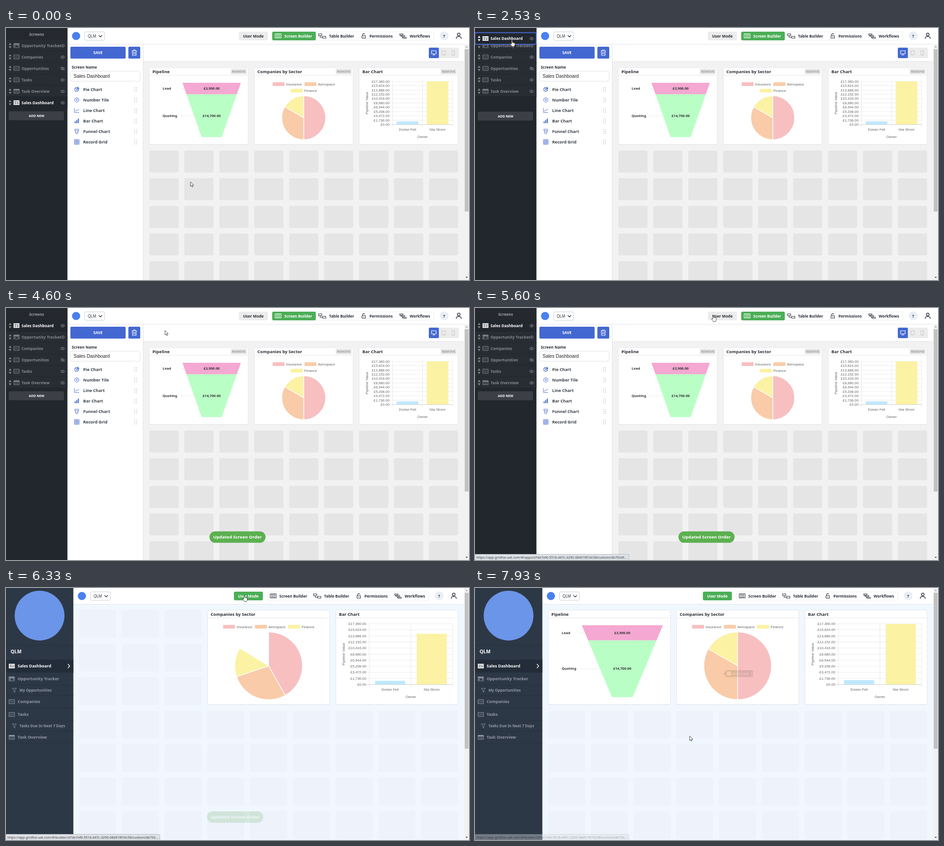
Write an HTML page that moves like this. It is 1014 px wide and 552 px high and loops after 8000 ms.

```html
<!DOCTYPE html>
<html lang="en">
<head>
<meta charset="utf-8">
<title>Screen order</title>
<style>
  html, body { margin: 0; width: 100%; height: 100%; overflow: hidden; background: #fff; }
  svg { display: block; width: 1014px; height: 552px; }
  text { font-family: "Noto Sans", "Open Sans", sans-serif; white-space: pre; }
  .arial { font-family: "Liberation Sans", Arial, sans-serif; }
</style>
</head>
<body>
<svg id="stage" viewBox="0 0 1014 552"></svg>
<script>
const LOOP = 8000;
const BLUE = '#4468d1', GREEN = '#4bae56', INK = '#2b3038';
const APP = 'QLM', OWNERS = ['Dorian Fell', 'Nia Strom'];
const SECTORS = [['Insurance', '#f7bfc0', 3], ['Aerospace', '#f9cba8', 2], ['Finance', '#fbf2a3', 1]];

// Drawing helpers
const rect = (x, y, w, h, fill, more = '') =>
  `<rect x="${x}" y="${y}" width="${w}" height="${h}" fill="${fill}" ${more}/>`;
const path = (d, stroke, width = 1, fill = 'none', more = '') =>
  `<path d="${d}" fill="${fill}" stroke="${stroke}" stroke-width="${width}" ${more}/>`;
const circle = (x, y, r, fill, more = '') => `<circle cx="${x}" cy="${y}" r="${r}" fill="${fill}" ${more}/>`;
// y is the vertical centre of the capitals
const text = (x, y, s, size, fill, weight = 600, anchor = 'start', more = '') =>
  `<text x="${x}" y="${(y + size * .36).toFixed(2)}" font-size="${size}" fill="${fill}" font-weight="${weight}" text-anchor="${anchor}" ${more}>${s}</text>`;
const label = (x, y, s, anchor = 'start', more = '') =>
  text(x, y, s, 7.8, '#666', 400, anchor, 'class="arial" ' + more);
const at = (x, y, body, more = '') => `<g transform="translate(${x} ${y})" ${more}>${body}</g>`;
const money = n => '£' + n.toLocaleString('en-US') + '.00';

// Small icons, centred on 0,0
const screenIcon = (kind, c) => {
  const frame = path('M-6-4.5H6V4.5H-6Z', c);
  if (kind === 'board') return frame + path('M-6-3.5H6', c, 2) + path('M-3.5-3V3M0-3V0M3.5-3V2', c, 1.8);
  if (kind === 'dash') return rect(-6.5, -5, 13, 10, c) + path('M-6-2H6M-6 1.5H6M-2-4V4M2.5-2V4', '#22262d', .7);
  if (kind === 'day') return frame + path('M-6-3H6', c, 2.5) + path('M-4 0H4M-4 2.5H4', c, 1, 'none', 'stroke-dasharray="2 1"');
  return frame + path('M-5-2H5M-5 0H5M-5 2H5', c, .8, 'none', 'opacity=".6"');
};
const eye = (c, off) => path('M-5 0Q0-6 5 0Q0 6-5 0Z', c, .9) + circle(0, 0, 1.6, 'none', `stroke="${c}" stroke-width=".9"`) +
  (off ? path('M-4-4L4.5 4', c, 1) : '');
const person = path('M-5.3 6.5V5Q-5.3 1.6-2 1.6H2Q5.3 1.6 5.3 5V6.5', INK, 1.4) +
  circle(0, -3, 3, 'none', `stroke="${INK}" stroke-width="1.4"`);
const filter = c => path('M-4.5-4.5H4.5L1 0V4.5L-1 3V0Z', c, .9);
const navIcons = [
  path('M-6.5-4.5H6.5V4.5H-6.5ZM-3.2-4.5V4.5M0-4.5V4.5M3.2-4.5V4.5', 'currentColor', 1.1),
  path('M-8-4.5H-1V-.5H-8ZM1 1H8V5H1ZM-4.5-.5V3H1', 'currentColor', 1.1),
  path('M-3.8-.5H3.8V5H-3.8ZM-2.3-.5V-3Q-2.3-5.2 0-5.2Q2.3-5.2 2.3-3.2M0 1.5V3', 'currentColor', 1.1),
  path('M-7.5-4.5H0V-2H-7.5ZM-3.5-1H4V1.5H-3.5ZM0 3H7.5V5.5H0ZM-6-2V.3H-3.5M-1 1.5V4.3H0', 'currentColor', 1)
];
const partIcons = [
  path('M-1-4A4.3 4.3 0 1 0 4 1H-1Z', BLUE, 1.1) + path('M1-5A4 4 0 0 1 5-1H1Z', BLUE, .5, BLUE),
  circle(0, 0, 4.8, 'none', `stroke="${BLUE}"`) + text(0, 0, '42', 4.5, BLUE, 700, 'middle'),
  path('M-5-5V4.5H5M-3 2L-.5-1L1 .5L5-3.5', BLUE, 1),
  path('M-3.5 1V5M0-2V5M3.5-5V5', BLUE, 2.2),
  path('M-4.5-5H4.5L1.8 5H-1.8ZM-3.8-2H3.8M-2.8 1.3H2.8', BLUE, .9),
  path('M-5-5H5V5H-5ZM-5-1.7H5M-5 1.7H5M-1.7-5V5M1.7-5V5', BLUE, 1)
];

// dx moves the left part, dr the right part; active is the chosen mode
function topBar(x0, dx, dr, active) {
  const names = ['Screen Builder', 'Table Builder', 'Permissions', 'Workflows'];
  const iconX = [596, 692.5, 783.5, 869.5], textX = [609.5, 707.5, 796, 884];
  const on = active === 'build';
  let s = rect(x0, 0, 1014 - x0, 35, '#fff') + path(`M${x0} 35.5H1003.5`, '#e2e4e8');
  s += circle(153.5 + dx, 17.5, 9, '#4a80ee');
  s += rect(172.5 + dx, 8.5, 43.5, 18.5, '#fff', 'rx="3" stroke="#c9ccd2"') + text(179 + dx, 17.8, APP, 8.4, INK, 400) +
    path(`M${203 + dx} 16l3.7 3.5l3.7-3.5`, INK, 1.4);
  s += rect(583.5 + dr, 8.5, 353, 18.5, '#fff', 'rx="3" stroke="#eceef0"');
  s += rect(510 + dr, 8, 63.5, 19, on ? '#ececec' : GREEN, 'rx="3"');
  if (on) s += rect(583, 8, 95.5, 19, GREEN, 'rx="3"');
  s += text(541.7 + dr, 17.5, 'User Mode', 8.45, on ? INK : '#fff', 600, 'middle');
  names.forEach((n, i) => {
    const c = on && !i ? '#fff' : INK;
    s += at(iconX[i] + dr, 17.3, navIcons[i], `color="${c}"`) + text(textX[i] + dr, 17.5, n, 8.45, c);
  });
  return s + circle(959.5 + dr, 17.2, 9.7, '#eaeef7') + text(959.5 + dr, 17.2, '?', 9.5, INK, 700, 'middle') +
    at(991.5 + dr, 17.3, person);
}

function scrollbar(top, end) {
  return rect(1003.5, top, 10.5, 552 - top, '#f1f1f1') + rect(1004.7, top + 10.5, 8.3, end - top - 10.5, '#c1c1c1') +
    path(`M1006.5 ${top + 6.5}l2.5-3l2.5 3Z`, 'none', 0, '#a3a3a3') + path('M1006.5 545l2.5 3l2.5-3Z', 'none', 0, '#505050');
}

function tiles(x, y, stepX, stepY, w, h, rows, fill) {
  let s = '';
  for (let r = 0; r < rows; r++) for (let c = 0; c < 9; c++)
    s += rect((x + c * stepX).toFixed(1), (y + r * stepY).toFixed(1), w, h, fill, 'rx="4"');
  return s;
}

function card(x, y, w, title, head, remove) {
  return rect(x, y + 1, w, 255 - y, '#000', 'rx="4" opacity=".06"') +
    rect(x, y, w, 255 - y, '#fff', 'rx="3.5" stroke="#e0e2e6" stroke-width=".8"') +
    path(`M${x} ${y + head}H${x + w}`, '#e6e6e8') + text(x + 6.8, y + head / 2 + .2, title, 9.45, INK) +
    (remove ? rect(x + w - 38, y + 2.3, 35, 12, '#e7e7e7', 'rx="2"') + text(x + w - 20.5, y + 8.2, 'REMOVE', 7.1, '#9b9b9b', 700, 'middle') : '');
}

function funnel(lx, mid, top, cut, halfTop, halfEnd) {
  const half = halfTop + (halfEnd - halfTop) * (cut - top) / (239 - top);
  const band = (y1, h1, y2, h2, fill) => path(`M${mid - h1} ${y1}H${mid + h1}L${mid + h2} ${y2}H${mid - h2}Z`, 'none', 0, fill);
  const line = (name, sum, y, h) => path(`M${lx + 38} ${y + .5}H${mid - h}`, '#e9e9e9', .8) +
    text(lx, y, name, 7.75, '#333', 700) + text(mid, y, sum, 7.7, '#333', 700, 'middle');
  const y1 = (top + cut) / 2 - .3, y2 = (cut + 239) / 2 - .3;
  return band(top, halfTop, cut, half, '#f5a8d1') + band(cut, half, 239, halfEnd, '#b9ffc5') +
    line('Lead', money(3900), y1, (halfTop + half) / 2) + line('Quoting', money(14700), y2, (half + halfEnd) / 2);
}

function pie(cx, cy, r, p) {
  let a = 0, s = '';
  const pt = v => `${(cx + r * Math.sin(v)).toFixed(2)} ${(cy - r * Math.cos(v)).toFixed(2)}`;
  for (const [, fill, n] of SECTORS) {
    const b = a + n / 6 * 2 * Math.PI * p;
    s += path(`M${cx} ${cy}L${pt(a)}A${r} ${r} 0 ${b - a > Math.PI ? 1 : 0} 1 ${pt(b)}Z`, '#fff', 1.4, fill);
    a = b;
  }
  return s;
}
const legend = spots => spots.map(([x, y], i) =>
  rect(x, y - 4, 26, 8, SECTORS[i][1]) + label(x + 29.5, y, SECTORS[i][0])).join('');

function axes(left, top, titleX) {
  const mid = (left + 978) / 2, step = (211.5 - top) / 10;
  let s = '';
  for (let i = 0; i <= 10; i++) {
    const y = 211.5 - i * step;
    s += path(`M${left - 4} ${y}H978`, i ? '#e6e6e6' : '#bdbdbd', .8) + label(left - 6.5, y - .2, money(1736 * i), 'end');
  }
  s += path(`M${left} ${top}V217M${mid} ${top}V217M978 ${top}V217`, '#e3e3e3', .8);
  OWNERS.forEach((n, i) => s += label(left + (978 - left) * (i / 2 + .25), 222.3, n, 'middle'));
  return s + label(mid, 237.7, 'Owner', 'middle') +
    label(0, 0, 'Pipeline Value', 'middle', `transform="translate(${titleX} ${(top + 211.5) / 2}) rotate(-90)"`);
}
function bars(left, top, p) {
  const half = (978 - left) / 2, w = half * .72, full = (211.2 - top) * p;
  return [[.071, '#bfe8fc'], [1, '#fbf2a3']].map(([v, fill], i) =>
    rect(left + half * (i + .14), 211.2 - full * v, w, full * v, fill)).join('');
}

// Builder page
const ROWS = [['Opportunity Tracker', 'board'], ['Companies', 'list'], ['Opportunities', 'list'],
  ['Tasks', 'list'], ['Task Overview', 'day'], ['Sales Dashboard', 'dash']];
function sideRow([name, kind], i) {
  const on = i === 5, c = on ? '#fff' : '#85898f';
  return `<g id="row${i}">` + rect(0, -12.5, 134.5, 25, on ? '#22262d' : '#282c33') + path('M0 12.2H134.5', '#1f2329', .8) +
    (on ? rect(0, -12.7, 134, 25.4, '#22262d', `id="lift" rx="3" stroke="${BLUE}" stroke-width="2"`) : '') +
    path('M6-1.5L9-6L12-1.5ZM6 1.5L9 6L12 1.5Z', 'none', 0, '#85898f', on ? 'id="grip"' : '') +
    at(23, 0, screenIcon(kind, c)) + text(34, 0, name, 8.56, c) + at(124, .3, eye('#85898f', i === 2)) + '</g>';
}

function builderPage() {
  const parts = ['Pie Chart', 'Number Tile', 'Line Chart', 'Bar Chart', 'Funnel Chart', 'Record Grid'];
  let s = rect(0, 0, 1014, 552, '#f2f2f2') + rect(135, 0, 166, 552, '#fff') + rect(301, 36, 703, 37, '#fff') +
    path('M301 73.5H1003.5', '#e3e3e3') + path('M300.5 36V552', '#e0e0e0') + topBar(134, 0, 0, 'build');
  s += rect(141, 41, 121, 26, BLUE, 'rx="2.5"') + text(201.3, 54.2, 'SAVE', 8.36, '#fff', 700, 'middle');
  s += rect(268, 41, 26, 26, BLUE, 'rx="2.5"') +
    at(281, 54, path('M-5.5-4H5.5M-2-4V-6H2V-4M-4.3-4L-3.8 6H3.8L4.3-4M-1.5-1.5V3.5M1.5-1.5V3.5', '#fff', 1.2));
  s += text(144, 86, 'Screen Name', 8.4, INK) + rect(141.5, 94.5, 152, 22, '#fff', 'rx="2.5" stroke="#dfe1e5"') +
    text(148, 105.2, 'Sales Dashboard', 10.35, '#222', 400, 'start', 'class="arial"');
  parts.forEach((n, i) => {
    const y = 134.4 + 23.05 * i;
    s += at(155, y, partIcons[i]) + text(169, y, n, 9.15, '#3a4048');
    for (let k = 0; k < 6; k++) s += circle(282 + k % 2 * 4, y - 4 + (k >> 1) * 4, 1, '#c4c4c4');
  });
  s += rect(926, 43, 66, 23, '#ececec', 'rx="2.5"') + rect(926, 43, 22, 23, BLUE, 'rx="2.5"') +
    at(937, 54.5, path('M-5-4.5H5V2H-5ZM0 2V4.5M-3 4.5H3', '#fff', 1.2)) +
    at(958.5, 54.5, path('M-3.7-4.5H3.7V4.5H-3.7ZM-1 3H1', '#c6c6c6', 1)) +
    at(979.5, 54.5, path('M-3-4.8H3V4.8H-3ZM-1 3.3H1', '#c6c6c6', 1));
  s += tiles(314, 268.5, 76.53, 60.6, 64, 48, 5, '#e5e5e5');
  ['Pipeline', 'Companies by Sector', 'Bar Chart'].forEach((n, i) => s += card(314 + 229.8 * i, 87, 216.3, n, 16.5, true));
  s += funnel(343, 450.4, 120, 145.3, 64, 22) + legend([[584, 123], [653.7, 123], [623.8, 137.2]]) + pie(652, 196.6, 48, 1) +
    axes(846.5, 117, 790.5) + bars(846.5, 117, 1) + scrollbar(36, 402);
  s += rect(0, 0, 134.5, 552, '#22262d') + rect(0, 0, 134.5, 26, '#25292f') + text(67, 13.8, 'Screens', 8.5, '#9da0a5', 600, 'middle');
  s += `<g id="add">` + rect(6, 182.5, 121, 19.5, '#3c4046', 'rx="2.5"') + text(67, 192.5, 'ADD NEW', 7.1, '#fff', 700, 'middle') + '</g>';
  return s + ROWS.map(sideRow).join('');
}

// User page
function userPage() {
  const menu = [['Sales Dashboard', 171, 'dash'], ['Opportunity Tracker', 199, 'board'], ['My Opportunities', 224], ['Companies', 249, 'list'],
    ['Tasks', 277, 'list'], ['Tasks Due In Next 7 Days', 302], ['Task Overview', 327, 'day']];
  let s = rect(0, 0, 1014, 552, '#f0f7ff') + topBar(147, 12.7, -10.9, 'user') + tiles(160, 48.3, 93.63, 73.45, 81, 60.7, 7, '#edf2fb');
  s += '<g id="cards">' + card(441.5, 48.5, 267.5, 'Companies by Sector', 17, false) + card(722.5, 48.5, 267.5, 'Bar Chart', 17, false) +
    legend([[475.5, 84.8], [545.2, 84.8], [618, 84.8]]) + axes(795.5, 78.3, 739.5) + '<g id="charts"></g></g>';
  s += '<g id="funnel">' + card(160.5, 48.5, 267.5, 'Pipeline', 17, false) + funnel(190, 322.6, 81.5, 114.7, 88.8, 22.8) + '</g>';
  s += scrollbar(0, 352) + rect(0, 0, 147.5, 552, '#2d3846') + circle(73.5, 60.5, 54.5, '#6b95e9') +
    path('M0 125.5H147.5', '#26303c') + text(10, 139.6, APP, 10.4, '#fff', 700);
  for (const [name, y, kind] of menu) {
    const on = kind === 'dash', c = on ? '#fff' : '#9299a3', h = kind ? 14 : 11;
    if (on) s += rect(0, 157, 147.5, 28, '#232d39') + path('M135.5 166.5l4 4.5l-4 4.5', '#fff', 1.5);
    s += path(`M0 ${y - h}H147.5M0 ${y + h}H147.5`, '#283340', .8);
    s += kind ? at(12.7, y, screenIcon(kind, c)) + text(25.5, y, name, 8.95, c) : at(18.3, y + .3, filter(c)) + text(29.5, y, name, 8.03, c);
  }
  return s;
}

const ARROW = path('M0 0V10L2.3 7.9L3.9 11.4L5.5 10.7L4 7.3H7Z', '#222', .8, '#fff');
const HAND = path('M0 .8Q0-.4 1-.4Q2 0 2 1V5Q3.6 4.2 4 5.4Q5.6 4.8 5.9 6Q7.4 5.7 7.4 7.2V9.8Q7.2 11.5 6.2 12.4V13.8H.8V12.6L-2.8 8.7Q-3.6 7.3-2.2 7L0 8.3Z', '#222', .8, '#fff');

const stage = document.getElementById('stage');
stage.innerHTML = `<g id="build">${builderPage()}</g><g id="user">${userPage()}</g><g id="tip"></g>` +
  `<g id="toast">${rect(-61.5, -12.5, 123, 25, '#5cb050', 'rx="12.5"')}${text(0, 0, 'Updated Screen Order', 9.6, '#fff', 600, 'middle')}</g>` +
  `<g id="status">${rect(-1, 539.5, 338, 14, '#dee1e6', 'stroke="#b8bcc2" rx="1.5"')}${text(3, 546.2, '', 7.32, '#3c4043', 400)}</g>` +
  `<g id="arrow">${ARROW}</g><g id="hand">${HAND}</g>`;
const $ = id => document.getElementById(id);
const url = $('status').querySelector('text');

// Timing
const clamp = v => Math.max(0, Math.min(1, v));
const ramp = (t, a, b) => clamp((t - a) / (b - a));
const smooth = p => p * p * (3 - 2 * p);
// Keys are [time, ...values]; segments after 7400 run at even speed
function follow(t, keys) {
  let i = 0;
  while (i < keys.length - 2 && t >= keys[i + 1][0]) i++;
  const [a, b] = [keys[i], keys[i + 1]], q = ramp(t, a[0], b[0]), p = a[0] > 7400 ? q : smooth(q);
  return a.slice(1).map((v, k) => v + (b[k + 1] - v) * p);
}
const POINTER = [[40, 404, 337], [870, 30, 170], [1070, 24, 165], [1330, 24, 165], [1470, 24, 161.5], [1930, 44, 68], [2100, 44, 68],
  [2350, 76, 22], [2530, 80, 27], [2670, 81, 29.5], [4080, 81, 29.5], [4930, 482, 59], [5000, 482, 59], [5600, 521, 16],
  [7430, 521, 16], [7680, 550, 125], [7810, 535, 222], [7930, 470, 324]];
const DRAG = [[1330, 162.7], [1470, 162.7], [1930, 64.5], [2100, 64.5], [2350, 16.5], [2530, 23], [2670, 25]];

const show = (id, on) => $(id).setAttribute('display', on ? 'inline' : 'none');
const fade = (id, o) => { $(id).setAttribute('opacity', o); show(id, o > 0); };
const move = (id, x, y) => $(id).setAttribute('transform', `translate(${x} ${y})`);

function drawTip(t) {
  const second = t >= 7740, [name, fill, n] = SECTORS[second ? 1 : 2];
  const x = second ? 548 : 562, y = second ? 187.5 : 139, w = second ? 61 : 55;
  $('tip').innerHTML = path(`M${x - 4} ${y}l4-3.5v7Z`, 'none', 0, '#000') + rect(x, y - 7.5, w, 15, '#000', 'rx="3.5"') +
    rect(x + 4, y - 4, 8, 8, fill, 'stroke="#fff" stroke-width=".7"') +
    text(x + 14, y, `${name}: ${n}`, 7.8, '#fff', 400, 'start', 'class="arial"');
  fade('tip', .8 * ramp(t, 7620, 7700) * (1 - ramp(t, 7830, 7945)));
}

function render(t) {
  const user = t >= 5800, dragging = t >= 1330 && t < 2870, dropped = t >= 2870;
  const [x, y] = follow(t, POINTER);
  show('build', !user);
  show('user', user);

  ROWS.forEach((_, i) => move('row' + i, 0, 38.5 + 25 * (dropped ? (i + 1) % 6 : i)));
  if (dragging) move('row5', 0, follow(t, DRAG)[0]);
  show('lift', dragging);
  move('add', 0, dragging ? .7 : 0);
  const overRow = x < 134 && (dropped || y > 150 && y < 176 || dragging);
  $('grip').setAttribute('fill', overRow ? '#fff' : '#85898f');

  if (user) {
    const p = 1 - Math.pow(1 - ramp(t, 5966, 6966), 4);
    show('cards', t >= 5950);
    show('funnel', t >= 6650);
    $('charts').innerHTML = p > 0 ? pie(575.2, 170.5, 74, p) + bars(795.5, 78.8, p) : '';
  }
  drawTip(t);

  const rise = smooth(ramp(t, 3210, 3530));
  move('toast', user ? 501.7 : 507, 501.8 + 12 * (1 - rise));
  fade('toast', rise * (1 - ramp(t, 6130, 6380)));

  const [page, end] = user ? ['builder', ''] : ['apps', 'df'];
  url.textContent = `https://app.gridfox-uat.com/#/${page}/d7de7ef6-5516-447c-3290-08d91f816c58/custom/db792${end}...`;
  fade('status', ramp(t, 5420, 5500) * (1 - .6 * ramp(t, 7820, 7930)));

  const link = overRow || (y < 27 && x > 499 && x < 573);
  show('hand', link);
  show('arrow', !link);
  move(link ? 'hand' : 'arrow', x, y);
}

const start = performance.now();
function tick() {
  render((performance.now() - start) % LOOP);
  requestAnimationFrame(tick);
}
tick();
</script>
</body>
</html>
```
